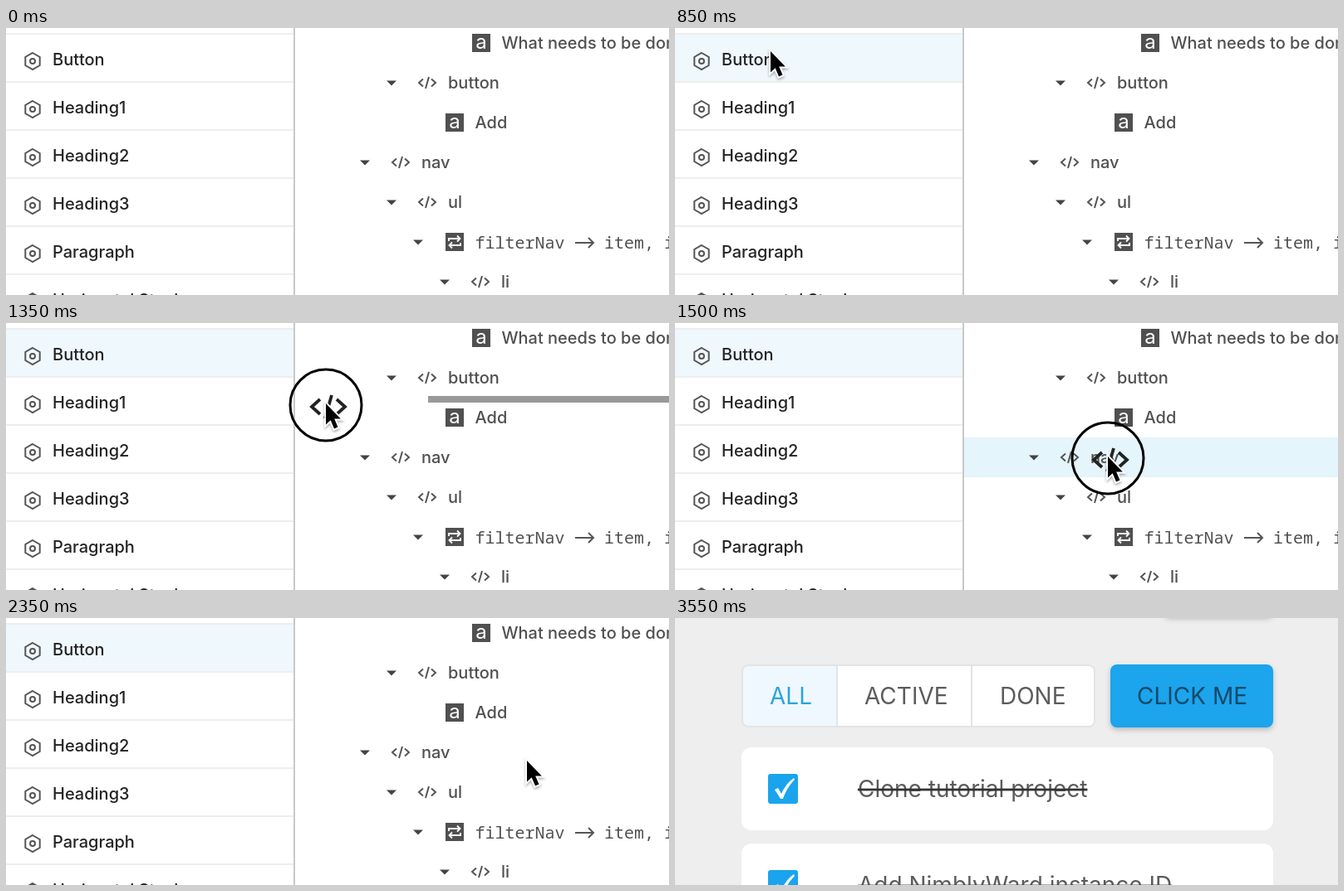
An HTML page that plays this animation: 798 px wide and 322 px high, repeating every 4270 ms.

```html
<!DOCTYPE html>
<html lang="en">
<head>
<meta charset="utf-8">
<title>Drag a component</title>
<style>
  html, body { margin: 0; width: 100%; height: 100%; overflow: hidden; background: #fff; }
  svg { display: block; width: 798px; height: 322px; font: 500 20px Inter, sans-serif; }
  .icon { fill: none; stroke: #555; stroke-width: 2; }
  .mono { font: 400 20px "Noto Sans Mono", monospace; }
  #result { font-size: 28px; font-weight: 400; fill: #5c5c5c; }
  .done { fill: #333; text-decoration: line-through; }
  .done tspan { fill: #5c5c5c; }
</style>
</head>
<body>
<svg viewBox="0 0 798 322">
  <defs>
    <path id="code" d="M-5 -4.5 -10 0 -5 4.5M5 -4.5 10 0 5 4.5M2 -7 -2 7"/>
    <path id="hexagon" d="M0 -10 8.7 -5V5L0 10 -8.7 5V-5Z M3 0A3 3 0 1 1 -3 0A3 3 0 1 1 3 0Z"/>
    <path id="caret" d="M-6 -2.5H6L0 3.5Z" fill="#444"/>
    <g id="letter">
      <rect x="-11" y="-11" width="22" height="22" fill="#505050"/>
      <text y="7" text-anchor="middle" fill="#fff" font-size="24" font-weight="400">a</text>
    </g>
    <g id="repeat">
      <rect x="-11" y="-11" width="22" height="22" fill="#505050"/>
      <path d="M-7 -1V-4H6M3 -7.5 6.5 -4 3 -.5M7 1V4H-6M-3 .5-6.5 4-3 7.5" fill="none" stroke="#fff" stroke-width="1.8"/>
    </g>
    <g id="check">
      <rect width="36" height="36" rx="3" fill="#1aa4ed"/>
      <path d="M8 19 12 17 16 24C19 17 24 10 31 5L32 7C26 13 21 21 18 30H15Z" fill="#fff"/>
    </g>
    <filter id="shadow" x="-50%" y="-50%" width="200%" height="200%">
      <feDropShadow dx="0" dy="2" stdDeviation="1.5" flood-opacity=".35"/>
    </filter>
    <filter id="lift" x="-20%" y="-20%" width="140%" height="160%">
      <feDropShadow dx="0" dy="3" stdDeviation="3" flood-opacity=".22"/>
    </filter>
  </defs>

  <g id="editor">
    <rect width="798" height="322" fill="#fff"/>
    <rect id="hover" width="346" height="57" fill="#eff8fc"/>
    <rect id="target" x="348" y="138" width="450" height="48" fill="#e4f5fb"/>
    <g id="palette" fill="#242424"></g>
    <path d="M347 0V322" stroke="#c8c8c8" stroke-width="2"/>
    <g id="tree" fill="#505050"></g>
    <rect id="bar" width="300" height="8" fill="#999"/>
    <g id="cursor">
      <g id="badge" fill="none" stroke="#000" stroke-width="3">
        <circle cy="2" r="43"/>
        <use href="#code" transform="translate(3 4) scale(2)" stroke="#222" stroke-width="1.9"/>
      </g>
      <path d="M0 0V25.5L5.7 20.2 10 30.5 14.5 28.6 10.2 18.5H17.8Z" stroke="#fff" stroke-width="3.6"
            paint-order="stroke" filter="url(#shadow)"/>
    </g>
  </g>

  <g id="result">
    <rect width="798" height="322" fill="#eee"/>
    <rect x="588" y="-70" width="132" height="68" rx="8" fill="#eee" filter="url(#lift)"/>
    <rect x="81" y="57" width="424" height="74" rx="7" fill="#fff"/>
    <path d="M195 57H88Q81 57 81 64V124Q81 131 88 131H195Z" fill="#eff8ff"/>
    <path d="M195 57V131M357 57V131" stroke="#e2e4e6" stroke-width="2"/>
    <rect x="81" y="57" width="424" height="74" rx="7" fill="none" stroke="#e2e4e6" stroke-width="2"/>
    <text x="114" y="104" fill="#2ba3dd">ALL</text>
    <text x="228" y="104">ACTIVE</text>
    <text x="391" y="104">DONE</text>
    <rect x="80" y="156" width="640" height="100" rx="12" fill="#fff"/>
    <rect x="80" y="272" width="640" height="100" rx="12" fill="#fff"/>
    <use href="#check" x="112" y="188"/>
    <use href="#check" x="112" y="304"/>
    <text class="done" x="220" y="216"><tspan>Clone tutorial project</tspan></text>
    <text class="done" x="220" y="332"><tspan>Add NimblyWard instance ID</tspan></text>
    <g id="button">
      <rect x="524" y="56" width="196" height="76" rx="8" fill="#1aa4ed" filter="url(#lift)"/>
      <text x="556" y="104" fill="#124a68">CLICK ME</text>
    </g>
  </g>
</svg>
<script>
const LOOP = 4270, STEP = 50;
const el = id => document.getElementById(id);
const show = (id, on) => el(id).setAttribute('display', on ? 'inline' : 'none');
const place = (id, x, y) => el(id).setAttribute('transform', `translate(${x} ${y})`);

// Left palette
el('palette').innerHTML =
  ['Button', 'Heading1', 'Heading2', 'Heading3', 'Paragraph', 'Horizontal Stack'].map((name, i) => {
    const y = 58 * i;
    return `<path d="M0 ${y + 7}H346" stroke="#eee" stroke-width="2"/>
      <use href="#hexagon" class="icon" x="32" y="${y + 40}"/>
      <text x="56" y="${y + 45}">${name}</text>`;
  }).join('');

// Right tree: icon, icon centre, label
el('tree').innerHTML = [
  ['letter', 572, 'What needs to be done?'],
  ['code', 507, 'button'],
  ['letter', 540, 'Add'],
  ['code', 475, 'nav'],
  ['code', 507, 'ul'],
  ['repeat', 540, 'filterNav'],
  ['code', 571, 'li']
].map(([icon, x, label], i) => {
  const y = 18 + 48 * i, mono = icon === 'repeat';
  const caret = icon === 'letter' ? '' : `<use href="#caret" x="${x - (mono ? 44 : 43)}" y="${y}"/>`;
  const extra = mono ? `<path class="icon" stroke-width="1.6" d="M685 ${y + 1}H707M701 ${y - 5}L707 ${y + 1}L701 ${y + 7}"/>
    <text class="mono" x="720" y="${y + 8}">item, index</text>` : '';
  return `${caret}<use href="#${icon}" class="${icon === 'code' ? 'icon' : ''}" x="${x}" y="${y}"/>
    <text class="${mono ? 'mono' : ''}" x="${x + (icon === 'code' ? 25 : 24.5)}" y="${y + (mono ? 8 : 7)}">${label}</text>${extra}`;
}).join('');

const mix = (a, b, k) => a + (b - a) * k;
const easeOut = (k, power) => 1 - (1 - k) ** power;

function cursorAt(t) {
  const part = (from, to) => Math.min(1, Math.max(0, (t - from) / (to - from)));
  if (t < 950) {
    const k = easeOut(part(400, 850), 1.7);
    return [mix(340, 115, k), mix(306, 28, k)];
  }
  if (t < 1350) {
    const k = part(950, 1350);
    return [mix(115, 385, k ** 1.4), mix(28, 97, k ** 2.2)];
  }
  if (t < 1500) {
    const k = part(1350, 1500);
    return [mix(385, 521, k), mix(97, 161, easeOut(k, 1.3))];
  }
  const k = part(1500, 1750);
  return [mix(521, 627, easeOut(k, 2)), mix(161, 172, easeOut(k, 2.5))];
}

function draw(now) {
  const t = Math.floor(now % LOOP / STEP) * STEP;
  const [x, y] = cursorAt(t);
  const dragging = t >= 950 && t < 2300;
  const row = t < 950 ? Math.max(0, Math.floor((y - 8) / 58)) : 0;

  show('result', t >= 2900);
  show('cursor', t >= 400);
  place('cursor', x, y);
  show('badge', dragging);
  show('hover', t >= 400 && x < 347 || t >= 950);
  place('hover', 0, 8 + 58 * row);

  const inTree = dragging && x >= 348;
  show('bar', inTree && t < 1500);
  place('bar', y < 138 ? 508 : 444, y < 114 ? 88 : 136);
  show('target', t >= 1500 && t < 2350);
  el('target').setAttribute('opacity', t < 2300 ? 1 : .5);
  el('button').setAttribute('opacity', Math.min(1, Math.max(0, (t - 3400) / 150)));
}

const start = performance.now();
function frame() {
  draw(performance.now() - start);
  requestAnimationFrame(frame);
}
frame();
</script>
</body>
</html>
```
